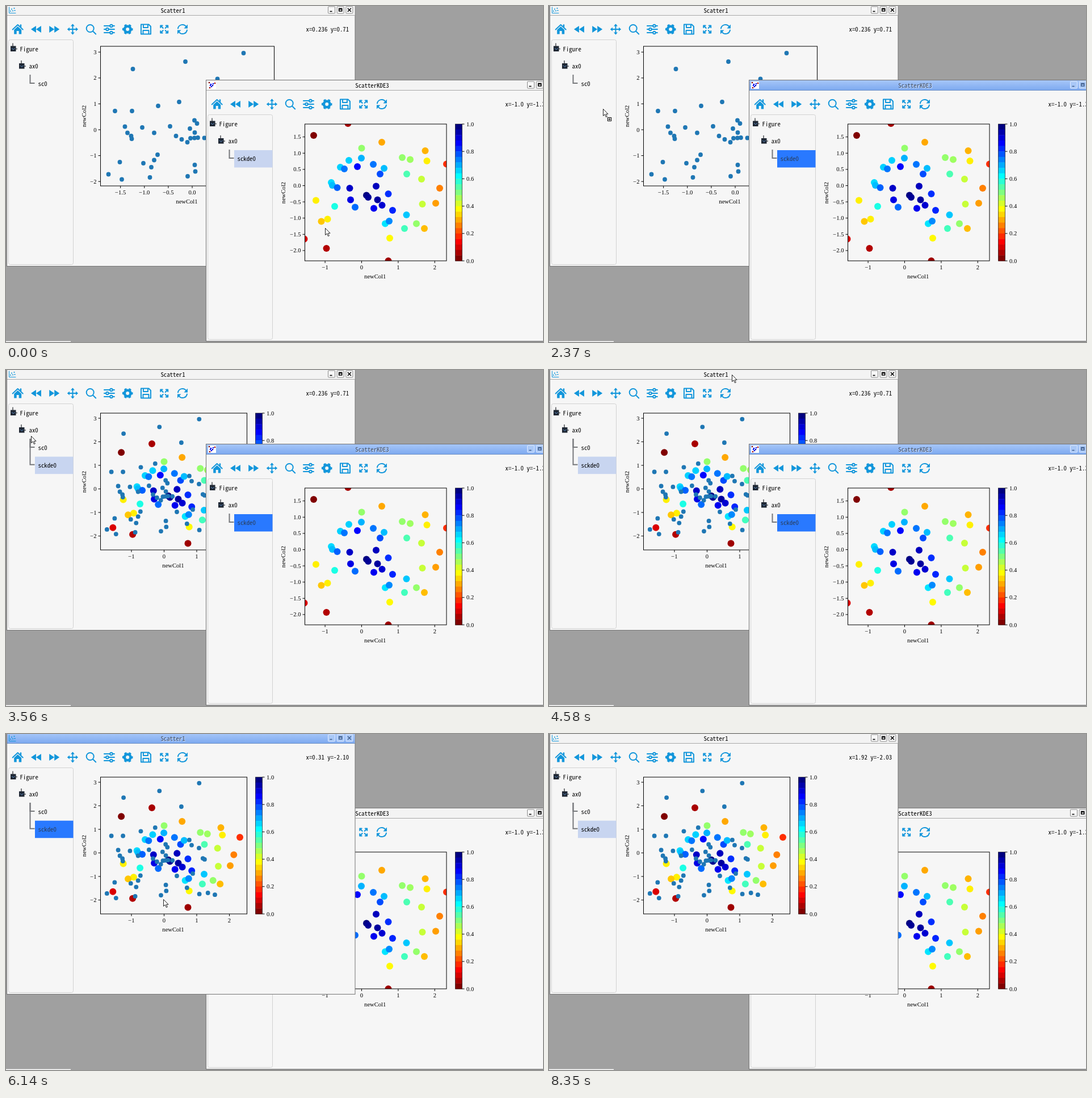
These frames come from a looping animation (946x592 px, 8.45 s). An HTML page:

```html
<!DOCTYPE html>
<html lang="en">
<head>
<meta charset="utf-8">
<title>Dragging a plot between windows</title>
<style>
html, body { margin: 0; width: 100%; height: 100%; overflow: hidden; background: #a0a0a0; }
svg { display: block; position: absolute; left: 0; top: 0; }
.mono { font: 10.8px "Noto Sans Mono CJK SC", "Noto Sans Mono CJK JP", "Liberation Mono", monospace; white-space: pre; }
.serif { font: 10.6px "Liberation Serif", serif; }
.mid { text-anchor: middle; }
.end { text-anchor: end; }
.line { fill: none; stroke: #1296db; stroke-width: 2; stroke-linecap: round; stroke-linejoin: round; }
.full { fill: #1296db; }
.axis { fill: none; stroke: #000; stroke-width: 1; }
.tree { fill: none; stroke: #77797c; stroke-width: 2; }
</style>
</head>
<body>
<svg id="stage" width="946" height="592" viewBox="0 0 946 592"></svg>
<script>
const LOOP = 8450;
const DRAG = 1830, CARRY = 1980, OVER = 2760, RELEASE = 2910, DROP = 3560, RAISE = 4860, BLUR = 8350;

// Pointer: time, tip x, tip y
const track = [
  [0, 562, 391], [430, 557, 408], [580, 530, 420], [700, 508, 425],
  [850, 480, 398], [970, 453, 360], [1090, 434, 318], [1210, 423, 288], [1330, 418, 269],
  [1980, 397, 270], [2130, 275, 241], [2250, 141, 205], [2370, 95, 181],
  [2520, 70, 151], [2640, 52, 125], [2760, 44, 113], [2910, 44, 116],
  [3710, 54, 143], [3830, 66, 175], [3950, 140, 116], [4070, 226, 60],
  [4190, 264, 28], [4310, 296, 17], [4460, 312, 11], [4580, 322, 8],
  [5320, 312, 180], [5440, 304, 303], [5560, 299, 300], [5710, 296.5, 296.7], [6140, 277, 291],
  [6290, 188, 242], [6410, 109, 203], [6560, 98, 194], [6710, 96, 194], [6860, 107, 196],
  [7010, 186, 172], [7160, 240, 168], [7280, 297, 166], [7400, 343, 167], [7550, 368, 199],
  [7670, 389, 293.7], [7670, -99, -99]
];

// Plot areas: box, pixel of the data origin, pixels per unit
const plain = { id: 'a', box: [166.5, 71, 472.5, 317], o: [328, 218], s: [84.2, -45.6],
  xt: [-1.5, -1, -.5, 0, .5, 1, 1.5], yt: [-2, -1, 0, 1, 2, 3], dec: [1, 0], lab: [137, 194] };
const merged = { id: 'b', box: [166.5, 76, 424.5, 317], o: [278.5, 209.5], s: [57.5, -41.5],
  xt: [-1, 0, 1, 2], yt: [-2, -1, 0, 1, 2, 3], dec: [0, 0], lab: [137, 197], bar: 439.5 };
const kde = { id: 'c', box: [526.5, 208, 776, 449], o: [626.5, 316.5], s: [64.4, -57.2],
  xt: [-1, 0, 1, 2], yt: [-2, -1.5, -1, -.5, 0, .5, 1, 1.5], dec: [0, 1], lab: [488, 329], bar: 791.5 };

const dots = [
  [418.5, 83], [316, 98], [223.5, 111], [372.5, 128.5], [305, 169], [268, 176], [192, 185], [222, 185],
  [209.5, 212.5], [240, 214], [214, 223.5], [261, 223.5], [220.5, 229], [221.5, 234], [289, 212],
  [299.5, 229], [309.5, 235], [319.5, 240], [324, 216], [332, 201.5], [336.5, 207], [332.5, 223],
  [325, 233], [332, 232.5], [338, 232], [349.5, 232.5], [267, 262], [261, 271.5], [242, 277],
  [256, 284], [200.5, 275], [180.5, 296.5], [204, 305.5], [253.5, 302], [332.5, 280], [333.5, 291.5],
  [320, 300], [393, 193], [399, 203], [418, 208.5], [428, 228.5], [432.5, 230.5], [402, 258],
  [361, 262.5], [387, 285.5], [419, 297.5], [441, 295.5], [459, 299]
];
// x, y, density in percent
const rim = [
  [542, 228, 0], [602.4, 207, 4], [525.5, 410.5, 9], [564.5, 427, 5], [673.5, 449, 3], [776, 278.5, 17],
  [662, 240, 29], [738.5, 255, 30], [741.5, 273, 36], [764, 321, 25], [757, 347.5, 28], [737, 392, 31],
  [732, 305, 43], [733.5, 349, 43], [698, 267, 48], [712, 270.5, 47], [706, 296, 55], [626.5, 250.5, 48],
  [723, 383.5, 48], [702, 392, 56], [676, 409, 37], [546, 342.5, 36], [579, 353, 60], [566.5, 375.5, 36],
  [555.5, 379.5, 32]
];
const core = [
  [626, 268, 70], [604, 272, 67], [589, 284, 67], [596, 287, 76], [619, 283, 87], [647, 279, 76],
  [659, 296, 80], [666, 286, 69], [573, 311, 66], [575, 316, 69], [583.5, 320, 78], [605.5, 321, 93],
  [607, 341.5, 90], [615, 354.5, 77], [652, 317.5, 94], [673.5, 331, 83], [635, 333.5, 100], [638, 337, 98],
  [654.5, 341.5, 97], [662.5, 351, 92], [648, 356.5, 89], [681, 360, 84], [668, 383.5, 65], [675, 379, 74],
  [705.5, 368, 68]
];

const text = (x, y, s, cls, more = '') => `<text x="${x}" y="${y}" class="${cls}" ${more}>${s}</text>`;
const mono = (x, y, s, cls = '', more) => text(x, y + 3.8, s, 'mono ' + cls, more);
const serif = (x, y, s, cls = '', more) => text(x, y + 3.5, s, 'serif ' + cls, more);
const rect = (x, y, w, h, more) => `<rect x="${x}" y="${y}" width="${w}" height="${h}" ${more}/>`;
const circle = (x, y, r, fill) => `<circle cx="${x}" cy="${y}" r="${r}" fill="${fill}"/>`;
const path = (d, cls) => `<path d="${d}" class="${cls}"/>`;
const num = (v, d) => v.toFixed(d).replace('-', '\u2212');

// Reversed jet colour map
function heat(t) {
  const c = k => Math.round(255 * Math.max(0, Math.min(1, 1.5 - Math.abs(4 * (1 - t) - k))));
  return `rgb(${c(3)},${c(2)},${c(1)})`;
}

// Moves a point from one plot area to another by its data value
const move = (p, from, to) => [0, 1].map(i => to.o[i] + (p[i] - from.o[i]) / from.s[i] * to.s[i]);

function marks(list, from, to, r, fill) {
  return list.map(p => {
    const [x, y] = move(p, from, to);
    return circle(x.toFixed(1), y.toFixed(1), r, fill(p));
  }).join('');
}

function colorBar(ax) {
  const [, top, , bottom] = ax.box, h = bottom - top, n = 25, x = ax.bar;
  let s = '';
  for (let i = 0; i < n; i++)
    s += rect(x, top + h * i / n, 12, h / n + .4, `fill="${heat(1 - i / (n - 1))}"`);
  s += rect(x, top, 12, h, 'class="axis" stroke-opacity=".6"');
  for (let i = 0; i <= 5; i++) {
    const y = bottom - h * i / 5;
    s += path(`M${x + 12} ${y}h4`, 'axis') + serif(x + 19.5, y, (i / 5).toFixed(1));
  }
  return s;
}

function plot(ax, withKde, withDots) {
  const [l, t, r, b] = ax.box;
  let s = `<clipPath id="${ax.id}">${rect(l, t, r - l, b - t, '')}</clipPath><g clip-path="url(#${ax.id})">`;
  if (withKde) s += marks(rim.concat(core), kde, ax, 6, p => heat(p[2] / 100));
  if (withDots) s += marks(dots, plain, ax, 3.9, () => '#1f77b4');
  s += '</g>' + rect(l, t, r - l, b - t, 'class="axis"');
  for (const v of ax.xt) {
    const x = ax.o[0] + v * ax.s[0];
    s += path(`M${x} ${b}v4`, 'axis') + serif(x, b + 11.5, num(v, ax.dec[0]), 'mid');
  }
  for (const v of ax.yt) {
    const y = ax.o[1] + v * ax.s[1];
    s += path(`M${l} ${y}h-4`, 'axis') + serif(l - 7, y, num(v, ax.dec[1]), 'end');
  }
  const [lx, ly] = ax.lab;
  s += serif((l + r) / 2 - 1, b + 27, 'newCol1', 'mid');
  s += `<g transform="translate(${lx} ${ly}) rotate(-90)">${serif(0, 0, 'newCol2', 'mid')}</g>`;
  return s + (ax.bar ? colorBar(ax) : '');
}

const icons = [
  path('M-9 .5L0-8L9 .5', 'line') + path('M-6.5 1L0-5L6.5 1V8.5H2V3H-2V8.5H-6.5ZM4-8.5H6.5V-3L4-5Z', 'full'),
  path('M-9 0L0-6V6ZM0 0L9-6V6Z', 'full'),
  path('M9 0L0-6V6ZM0 0L-9-6V6Z', 'full'),
  path('M-8 0H8M0-8V8', 'line') +
    path('M-9.5 0L-5.5-3.5V3.5ZM9.5 0L5.5-3.5V3.5ZM0-9.5L-3.5-5.5H3.5ZM0 9.5L-3.5 5.5H3.5Z', 'full'),
  path('M5-1.5A6.5 6.5 0 1 1-8-1.5A6.5 6.5 0 1 1 5-1.5M3.5 3.5L8.5 8.5', 'line'),
  path('M-9-6H1M6-6H9M-9 0H-6M-1 0H9M-9 6H1M6 6H9', 'line') +
    [[3.5, -6], [-3.5, 0], [3.5, 6]].map(p => `<circle cx="${p[0]}" cy="${p[1]}" r="2.2" class="line"/>`).join(''),
  '<circle r="5.3" fill="none" stroke="#1296db" stroke-width="4.6"/>' +
    '<circle r="8" fill="none" stroke="#1296db" stroke-width="2.6" stroke-dasharray="4.2 4.177" stroke-dashoffset="2.1"/>',
  path('M-8.5-8.5H5L8.5-5V8.5H-8.5ZM-4.5-8V-3H3.5V-8M-5 8V2H5V8', 'line'),
  path('M-6.5-3V-6.5H-3M-6.5-6.5L-2-2M6.5-3V-6.5H3M6.5-6.5L2-2M-6.5 3V6.5H-3M-6.5 6.5L-2 2M6.5 3V6.5H3M6.5 6.5L2 2', 'line'),
  path('M-8-1.5A8 8 0 0 1 6.5-4.5M8 1.5A8 8 0 0 1-6.5 4.5', 'line') +
    path('M9-8.5V-1.5H2.5ZM-9 8.5V1.5H-2.5Z', 'full')
].map((s, i) => `<g transform="translate(${20.7 + 32.25 * i} 41)">${s}</g>`).join('');

const badges = [
  path('M5.5 2V12.5H17', 'line" style="stroke-width:1') +
    [[8, 9], [10, 5.5], [12, 8.5], [14.5, 4], [15.5, 8]].map(p => circle(...p, 1.1, '#1296db')).join(''),
  rect(5, 1, 14, 13, 'fill="#fff"') +
    [[7, 3, 0], [17, 4, 4], [8, 12, 3], [10, 6, 90], [13, 8, 95], [11, 10, 90], [14, 5, 85], [9, 8, 85]]
      .map(p => circle(p[0], p[1], 1.3, heat(p[2] / 100))).join('')
];

const check = (x, y) => path(`M${x + 4} ${y - 10}V${y}H${x + 12}`, 'tree') +
  rect(x, y - 5, 9.5, 9.5, 'fill="#1f2733"') +
  `<path d="M${x + 2} ${y - 1.5}l2.8 3l2.8-3" fill="none" stroke="#5d8fc9"/>`;

function tree(items, picked, active) {
  let s = check(8, 75.5) + mono(24.5, 76, 'Figure') + check(23, 106) + mono(40.5, 106.5, 'ax0');
  items.forEach((name, i) => {
    const y = 136 + 30.7 * i;
    if (name === picked) s += rect(51, y - 14, 67.5, 30.5, `fill="${active ? '#2979ff' : '#c8d5f0'}"`);
    s += path(`M42.5 121V${y}H50.5`, 'tree') +
      mono(56.5, y + 1, name, '', `fill="${active && name === picked ? '#2b3c55' : '#000'}"`);
  });
  return s;
}

function buttons(active) {
  const ink = active ? '#44628f' : '#000';
  const glyphs = ['M3 8.5H7', 'M3.5 3.5H8.5V8H3.5ZM3 4.5H9', 'M3 3L9 9M9 3L3 9'];
  return glyphs.map((d, i) => `<g transform="translate(${567.5 + 15.7 * i} 1)">` +
    rect(0, 0, 12, 12, `rx="1" fill="${active ? '#a9c8f7' : '#f8f8f8'}" stroke="${active ? '#dfeaff' : '#8a8a8a'}"`) +
    `<path d="${d}" fill="none" stroke="${ink}" stroke-width="1.6"/></g>`).join('');
}

function frame(x, y, title, badge, active, body, coords) {
  const head = active
    ? mono(295, 9, title, 'mid', 'fill="#d8e6ff"') + mono(294, 8, title, 'mid', 'fill="#3d4a5e"')
    : mono(294, 8, title, 'mid');
  return `<g transform="translate(${x} ${y})">` +
    rect(1.5, -1.5, 613.5, 460, 'fill="#f6f6f6" stroke="#757575"') +
    rect(2, -1, 612.5, 17, `fill="${active ? 'url(#bar)' : '#f3f3f3'}"`) +
    `<path d="M2 16.5H615" stroke="${active ? '#6c8fc4' : '#a8a8a8'}"/>` +
    badges[badge] + head + buttons(active) + icons +
    mono(528.5, 41.5, coords) +
    rect(4.5, 59.5, 114, 396, 'rx="3" fill="#f6f6f6" stroke="#d2d2d2"') + body + '</g>';
}

// Last pointer place inside the merged plot, one step behind the pointer
function readout(i) {
  const { box: [l, t, r, b], o, s } = merged;
  for (let k = i - 1; k >= 0 && track[k][0] > RAISE; k--) {
    const [, x, y] = track[k];
    if (x > l && x < r && y > t && y < b)
      return `x=${((x - o[0]) / s[0]).toFixed(2)} y=${((y - o[1]) / s[1]).toFixed(2)}`;
  }
  return 'x=0.236 y=0.71';
}

function pointer(x, y, carrying) {
  const plus = carrying
    ? rect(8.5, 15.5, 6, 6, 'fill="#fff" stroke="#000"') + '<path d="M9.5 18.5h4M11.5 16.5v4" stroke="#000"/>' : '';
  return `<g transform="translate(${x} ${y})"><path d="M.5 .5V12.5L3.3 9.9L5.4 14.6L7.3 13.8L5.3 9.3H9Z" ` +
    `fill="#fff" stroke="#222"/>${plus}</g>`;
}

function scene(t, step) {
  const dropped = t >= DROP;
  const act1 = t >= RAISE && t < BLUR, act2 = t >= DRAG && t < RAISE;
  const target = t >= OVER && t < DROP ? rect(35.5, 91.5, 83, 29, 'fill="none" stroke="#8a8a8a"') : '';
  const names = dropped ? ['sc0', 'sckde0'] : ['sc0'];
  const one = frame(0, 0, 'Scatter1', 0, act1, tree(names, 'sckde0', act1) + target, readout(step)) +
    (dropped ? plot(merged, true, true) : plot(plain, false, true));
  const two = frame(351, 132, 'ScatterKDE3', 1, act2, tree(['sckde0'], 'sckde0', act2), 'x=-1.0 y=-1.30') +
    plot(kde, true, false);
  const [, x, y] = track[step];
  return '<defs><linearGradient id="bar" x2="0" y2="1"><stop stop-color="#a6c6f8"/>' +
    '<stop offset="1" stop-color="#7eaaf0"/></linearGradient></defs>' +
    rect(0, 0, 946, 592, 'fill="#a0a0a0"') + rect(0, 590.5, 114, 2, 'fill="#fff"') +
    (t >= RAISE ? two + one : one + two) +
    (t < BLUR ? pointer(x, y, t >= CARRY && t < RELEASE) : '');
}

const stage = document.getElementById('stage');
const cuts = [DRAG, CARRY, OVER, RELEASE, DROP, RAISE, BLUR];
let shown = '';

function render(t) {
  let step = 0;
  while (step + 1 < track.length && track[step + 1][0] <= t) step++;
  const key = step + '/' + cuts.filter(c => c <= t).length;
  if (key === shown) return;
  shown = key;
  stage.innerHTML = scene(t, step);
}

const start = performance.now();
function tick() {
  render((performance.now() - start) % LOOP);
  requestAnimationFrame(tick);
}
render(0);
tick();
</script>
</body>
</html>
```
